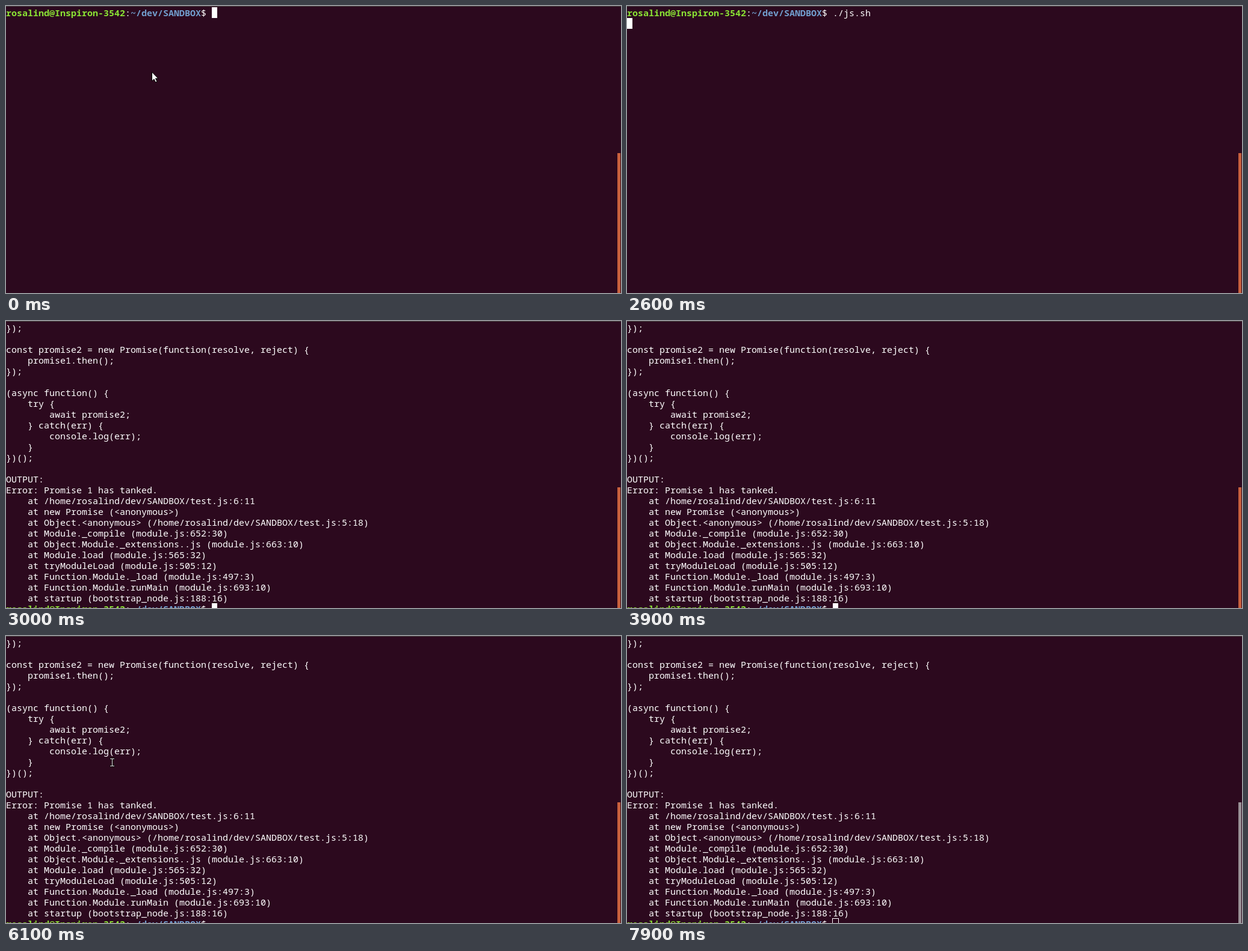
Animation, 1022 px wide and 478 px high, one loop 8000 ms. Source, as an HTML page with a canvas:

```html
<!DOCTYPE html>
<html lang="en">
<head>
<meta charset="utf-8">
<title>Terminal</title>
<style>
  html, body { margin: 0; width: 100%; height: 100%; overflow: hidden; background: #2c091e; }
  #stage { position: relative; width: 1022px; height: 478px; overflow: hidden; }
  pre {
    position: absolute; left: 0; top: 2px; margin: 0;
    font: 15px/18px "Noto Sans Mono", "DejaVu Sans Mono", monospace;
    font-variant-ligatures: none;
    color: #fff;
  }
  b { font-weight: 700; color: #8ae234; }
  b.path { color: #729fcf; }
  canvas { position: absolute; left: 0; top: 0; }
</style>
</head>
<body>
<div id="stage"><pre id="text"></pre><canvas id="shapes" width="1022" height="478"></canvas></div>
<script>
const LOOP = 8000, CELL = 9, ROW = 18, TOP = 2, PROMPT = 38;
const text = document.getElementById('text');
const ctx = document.getElementById('shapes').getContext('2d');

const user = 'rosalind';
const prompt = `<b>${user}@Inspiron-3542</b>:<b class="path">~/dev/SANDBOX</b>$ `;
const escape = s => s.replace(/</g, '&lt;').replace(/>/g, '&gt;');

const code = `CODE:
process.on('unhandledRejection', function(err) {
    console.log(err);
});

const promise1 = new Promise(function(resolve, reject) {
    throw new Error('Promise 1 has tanked.');
});

const promise2 = new Promise(function(resolve, reject) {
    promise1.then();
});

(async function() {
    try {
        await promise2;
    } catch(err) {
        console.log(err);
    }
})();

OUTPUT:
`;
const trace = `Error: Promise 1 has tanked.
    at /home/${user}/dev/SANDBOX/test.js:6:11
    at new Promise (<anonymous>)
    at Object.<anonymous> (/home/${user}/dev/SANDBOX/test.js:5:18)
    at Module._compile (module.js:652:30)
    at Object.Module._extensions..js (module.js:663:10)
    at Module.load (module.js:565:32)
    at tryModuleLoad (module.js:505:12)
    at Function.Module._load (module.js:497:3)
    at Function.Module.runMain (module.js:693:10)
    at startup (bootstrap_node.js:188:16)
`;

const command = prompt + './js.sh';
const listing = command + '\n' + escape(code);
const finished = (listing + escape(trace)).split('\n').slice(8).join('\n') + prompt;

// Screen contents with the terminal cursor's cell
const screens = [
  { at: 0, html: prompt, col: PROMPT, row: 0 },
  { at: 1400, html: prompt + 'cl', col: PROMPT + 2, row: 0 },
  { at: 1500, html: prompt + 'clear', col: PROMPT + 5, row: 0 },
  { at: 2000, html: command, col: PROMPT + 7, row: 0 },
  { at: 2600, html: command, col: 0, row: 1 },
  { at: 2700, html: listing, col: 0, row: 23 },
  { at: 3000, html: finished, col: PROMPT, row: 26 }
];

// Times at which the cursor toggles, starting visible
const blinks = [1000, 1200, 2400, 2600, 3200, 3800, 4400, 5500, 5600, 6300, 6900, 7500];

const mix = (a, b, k) => a + (b - a) * k;
const easeInOut = k => k * k * (3 - 2 * k);
const easeOut = k => 1 - (1 - k) * (1 - k);

function drawArrow(x, y) {
  const shape = [[0, 0], [0, 15], [3.5, 11.8], [6, 17], [8.5, 16], [6, 10.8], [10.5, 10.8]];
  ctx.beginPath();
  shape.forEach(([dx, dy]) => ctx.lineTo(x + dx, y + dy));
  ctx.closePath();
  ctx.fillStyle = '#fff';
  ctx.fill();
  ctx.strokeStyle = '#000';
  ctx.lineWidth = 1;
  ctx.stroke();
}

function drawBeam(cx, cy) {
  const x = Math.round(cx), y = Math.round(cy);
  const bars = [[x, y - 6, 1, 13], [x - 3, y - 6, 3, 1], [x + 1, y - 6, 3, 1],
                [x - 3, y + 6, 3, 1], [x + 1, y + 6, 3, 1]];
  ctx.fillStyle = 'rgba(0,0,0,0.6)';
  bars.forEach(([a, b, w, h]) => ctx.fillRect(a - 1, b - 1, w + 2, h + 2));
  ctx.fillStyle = '#e8e6e7';
  bars.forEach(bar => ctx.fillRect(...bar));
}

function drawPointer(t) {
  if (t < 500) drawArrow(242.5, 110);
  else if (t < 1400) drawArrow(241.5, 103);
  else if (t >= 4100 && t < 6100) {
    const k = easeInOut(Math.min(1, (t - 4100) / 400));
    drawBeam(mix(250, 274, k), mix(121, 285, k));
  } else if (t >= 6100 && t < 6900) {
    const k = easeOut(Math.min(1, (t - 6100) / 600));
    drawBeam(mix(176, 80, k), mix(210, 11, k));
  }
}

function drawCursor(t, { col, row }) {
  const x = col * CELL, y = TOP + row * ROW;
  if (t >= 7900) {
    ctx.strokeStyle = '#fff';
    ctx.lineWidth = 1;
    ctx.strokeRect(x - 0.5, y + 0.5, CELL + 1, ROW - 1);
  } else if (blinks.filter(b => b <= t).length % 2 === 0) {
    ctx.fillStyle = '#fff';
    ctx.fillRect(x, y, CELL, ROW);
  }
}

function drawFrame(t) {
  ctx.clearRect(0, 0, 1022, 478);
  ctx.fillStyle = '#45403f';
  ctx.fillRect(0, 0, 1022, 1);
  const barTop = t < 2700 ? 245 : 277;
  ctx.fillStyle = t < 7900 ? '#c9603d' : '#9a9297';
  ctx.fillRect(1016, barTop, 5, 478 - barTop);

  const screen = screens.filter(s => s.at <= t).pop();
  if (text.dataset.at !== String(screen.at)) {
    text.innerHTML = screen.html;
    text.dataset.at = screen.at;
  }
  drawCursor(t, screen);
  drawPointer(t);
}

const start = performance.now();
function tick() {
  const t = (performance.now() - start) % LOOP;
  drawFrame(Math.floor(t / 100) * 100);
  requestAnimationFrame(tick);
}
tick();
</script>
</body>
</html>
```
